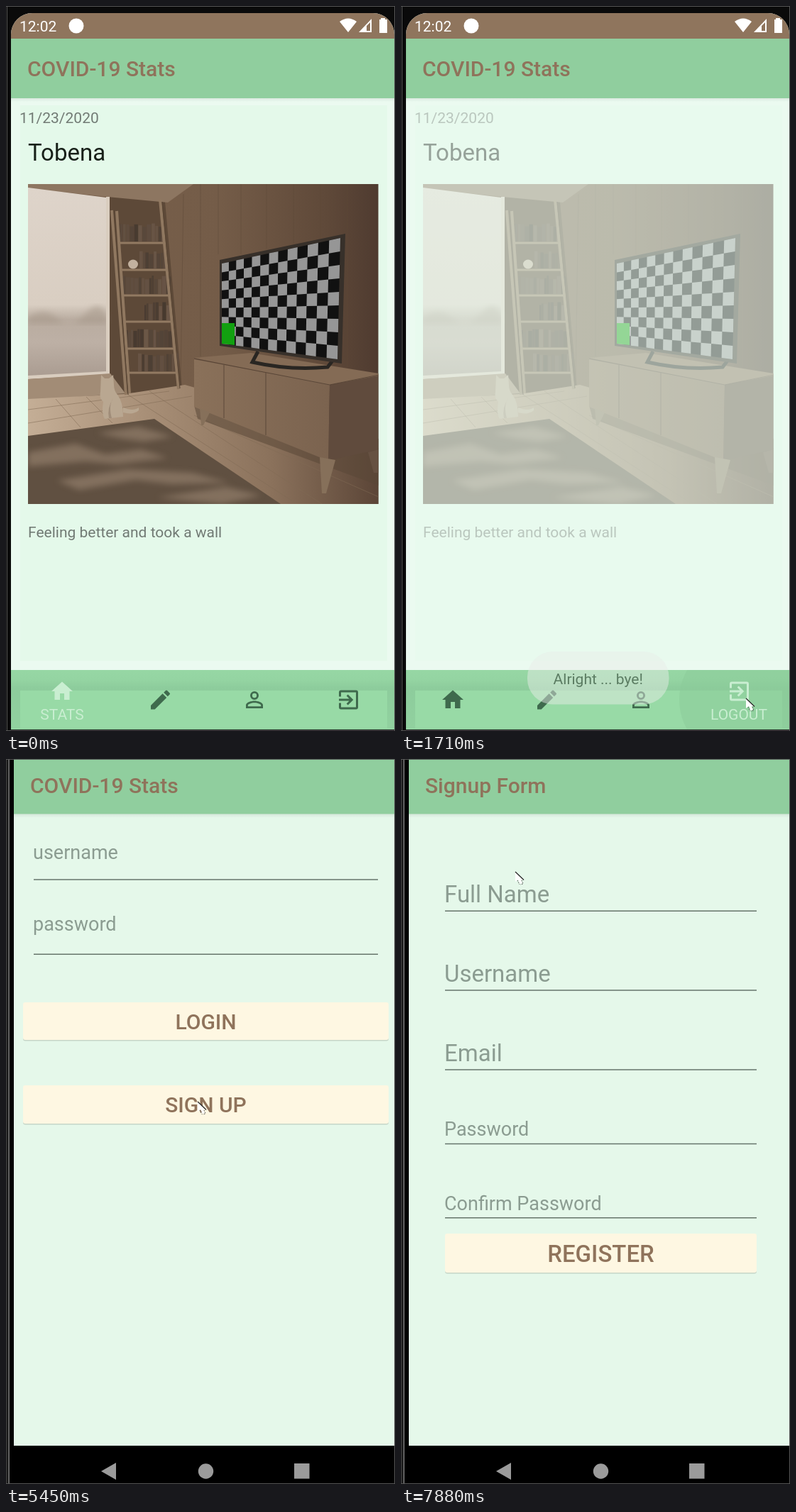
Recreate the animation shown at these times as an HTML page. Size 548 px wide and 1022 px high, loop 8000 ms.

```html
<!DOCTYPE html>
<html lang="en">
<head>
<meta charset="utf-8">
<title>Stats app</title>
<style>
html, body { margin: 0; width: 100%; height: 100%; overflow: hidden; background: #000; }
svg { display: block; width: 100vw; height: 100vh; }
text { font-family: Roboto, "Noto Sans", sans-serif; font-size: 21px; }
.title { font-size: 30px; font-weight: 500; fill: #8f735b; }
.button { font-weight: 500; fill: #8f735b; text-anchor: middle; }
.hint { fill: #8b9c91; }
.muted { fill: #717a74; }
.mid { text-anchor: middle; }
.on { fill: #c9eed1; }
.off { fill: #3f6a4d; }

.anim { animation: 8s step-end infinite; }
#home { animation-name: home; }
#account { animation-name: account; }
#content { animation-name: content; }
#tabsStats { animation-name: tabsStats; }
#tabsLogout { animation-name: tabsLogout; }
#ripple { animation-name: ripple; transform-origin: 476px 978px; }
#toast { animation-name: toast; }
#login { animation-name: login; transform-origin: 281.5px 490px; }
#loginTitle { animation-name: loginTitle; }
#press { animation-name: press; }
#signup { animation-name: signup; transform-origin: 281.5px 490px; }
#cursor { animation-name: cursor; }

@keyframes home { 0% { visibility: visible } 68.125%, 100% { visibility: hidden } }
@keyframes account { 0% { visibility: hidden } 68.125%, 100% { visibility: visible } }
@keyframes content {
  0% { opacity: 1 } 18% { opacity: .3 } 19.5% { opacity: 0 }
  21.375% { opacity: .4 } 22.9% { opacity: .85 } 24.5%, 100% { opacity: 1 }
}
@keyframes tabsStats { 0% { opacity: 1 } 18%, 100% { opacity: 0 } }
@keyframes tabsLogout { 0% { opacity: 0 } 18%, 100% { opacity: 1 } }
@keyframes ripple {
  0% { opacity: 0; transform: scale(.4) } 16.5% { opacity: .8; transform: scale(.4) }
  18% { opacity: 1; transform: scale(.75) } 19.5% { opacity: 1; transform: none }
  21.375% { opacity: .5; transform: none } 22.9%, 100% { opacity: 0; transform: none }
}
@keyframes toast {
  0% { opacity: 0 } 19.5% { opacity: .14 } 21.375% { opacity: .5 } 22.9% { opacity: .85 }
  24.5% { opacity: 1 } 43.875% { opacity: .75 } 45.4% { opacity: .4 } 46.875% { opacity: .1 }
  48.75%, 100% { opacity: 0 }
}
@keyframes login {
  0% { opacity: 1; transform: none } 86.625% { opacity: 1; transform: scale(1.008) }
  88.25% { opacity: 1; transform: scale(1.045) } 90.125% { opacity: 1; transform: scale(1.05) }
  91.75%, 100% { opacity: 0; transform: none }
}
@keyframes loginTitle { 0% { opacity: 1 } 88.25%, 100% { opacity: 0 } }
@keyframes press { 0% { opacity: 0 } 76% { opacity: .11 } 77.875% { opacity: .03 } 86.625%, 100% { opacity: 0 } }
@keyframes signup {
  0% { opacity: 0; transform: scale(.96) } 88.25% { opacity: 1; transform: scale(.96) }
  90.125% { opacity: 1; transform: scale(.993) } 91.75%, 100% { opacity: 1; transform: none }
}
@keyframes cursor {
  0% { opacity: 0; transform: translate(502px, 896px) }
  3.5% { opacity: 1; transform: translate(502px, 896px) }
  5% { opacity: 1; transform: translate(497px, 925px) }
  6.5% { opacity: 1; transform: translate(491px, 958px) }
  8% { opacity: 1; transform: translate(488px, 975px) }
  9.875% { opacity: 1; transform: translate(486px, 976px) }
  28.125% { opacity: 1; transform: translate(435px, 984px) }
  29.7% { opacity: 1; transform: translate(380px, 988px) }
  31.25% { opacity: 0; transform: translate(349px, 988px) }
  68.125% { opacity: 1; transform: translate(270px, 483px) }
  95% { opacity: 1; transform: translate(227px, 387px) }
  97% { opacity: 1; transform: translate(186px, 238px) }
  98.5%, 100% { opacity: 1; transform: translate(161px, 159px) }
}
</style>
</head>
<body>
<svg viewBox="0 0 548 1022" preserveAspectRatio="none">
<defs>
  <linearGradient id="wall"><stop stop-color="#79614c"/><stop offset=".55" stop-color="#745c48"/><stop offset=".85" stop-color="#5f4939"/><stop offset="1" stop-color="#4f3b30"/></linearGradient>
  <linearGradient id="sky" x2="0" y2="1"><stop stop-color="#ded4ca"/><stop offset=".62" stop-color="#d9cec2"/><stop offset=".7" stop-color="#b9aca0"/><stop offset=".82" stop-color="#bdb0a5"/><stop offset="1" stop-color="#aa9c91"/></linearGradient>
  <linearGradient id="floor"><stop stop-color="#c4ae96"/><stop offset=".35" stop-color="#a78e76"/><stop offset=".7" stop-color="#8a715b"/><stop offset="1" stop-color="#5b4537"/></linearGradient>
  <linearGradient id="front"><stop stop-color="#8a715a"/><stop offset="1" stop-color="#7b634f"/></linearGradient>
  <linearGradient id="shade" x2="0" y2="1"><stop stop-opacity=".07"/><stop offset="1" stop-opacity="0"/></linearGradient>
  <linearGradient id="band" x2="0" y2="1"><stop stop-color="#96d7a4"/><stop offset=".17" stop-color="#94d4a2"/><stop offset=".3" stop-color="#8dcc9c"/><stop offset="1" stop-color="#91d19f"/></linearGradient>
  <filter id="soft"><feGaussianBlur stdDeviation="4"/></filter>
  <clipPath id="screen"><path d="M7 1020V40A30 30 0 0 1 37 10H517A30 30 0 0 1 547 40V1020z"/></clipPath>
  <clipPath id="photo"><path d="M31 251H524.500V702H31z"/></clipPath>
  <clipPath id="rug"><path d="M31 606 209 582 387 702H31z"/></clipPath>
  <clipPath id="bar"><path d="M7 936H547V1020H7z"/></clipPath>
  <clipPath id="panel"><path d="M11 1H547V1021H11z"/></clipPath>
  <path id="house" d="M10 20v-6h4v6h5v-8h3L12 3 2 12h3v8z"/>
  <path id="pencil" d="M3 17.25V21h3.75L17.81 9.94l-3.75-3.75zM20.71 7.04a1 1 0 0 0 0-1.41l-2.34-2.34a1 1 0 0 0-1.41 0l-1.83 1.83 3.75 3.75z"/>
  <path id="person" fill-rule="evenodd" d="M12 5.900a2.100 2.100 0 1 1 0 4.200 2.100 2.100 0 0 1 0-4.200m0 9c2.970 0 6.100 1.460 6.100 2.100v1.100H5.900V17c0-.64 3.130-2.100 6.100-2.100M12 4a4 4 0 1 0 0 8 4 4 0 0 0 0-8m0 9c-2.670 0-8 1.340-8 4v3h16v-3c0-2.660-5.330-4-8-4z"/>
  <path id="exit" d="M10.090 15.590 11.500 17l5-5-5-5-1.410 1.410L12.670 11H3v2h9.670zM19 3H5a2 2 0 0 0-2 2v4h2V5h14v14H5v-4H3v4a2 2 0 0 0 2 2h14a2 2 0 0 0 2-2V5a2 2 0 0 0-2-2z"/>
</defs>

<g id="home" class="anim">
  <path fill="#0a0a0a" d="M0 0H548V1022H0z"/>
  <path stroke="#555" d="M1.500 0V1022M0 .5H548M547.500 0V1022M0 1021.500H548"/>
  <g clip-path="url(#screen)">
    <path fill="#ebfaf0" d="M7 10H547V1020H7z"/>
    <path fill="#8f755d" d="M7 10H547V46H7z"/>
    <path fill="#90ce9e" d="M7 46H547V130H7z"/>
    <path fill="url(#shade)" d="M7 130H547V135H7z"/>
    <g fill="#fff">
      <text x="19" y="36">12:02</text>
      <circle cx="99" cy="28" r="10.500"/>
      <path d="M470 22Q482 13 494 22L482 37zM528 17h6v2h3v19h-11v-19h2z"/>
      <path fill-rule="evenodd" d="M497 37 515 18V37zM508 35H513V23L508 28z"/>
    </g>
    <text class="title" x="30" y="99">COVID-19 Stats</text>

    <g id="content" class="anim">
      <path fill="#e4f9ea" d="M20 140H537V923H20z"/>
      <text class="muted" x="19" y="164.500">11/23/2020</text>
      <text x="31" y="218" style="font-size:33px" fill="#182019">Tobena</text>
      <g clip-path="url(#photo)">
        <path fill="url(#wall)" d="M31 251H525V702H31z"/>
        <path fill="#5d4938" d="M143 268 224 276 248 540 143 548z"/>
        <path fill="#8d7661" d="M31 251H264L228 277 143 269 31 257z"/>
        <path fill="url(#sky)" d="M31 256 141 270V517L31 522z"/>
        <path fill="#a39486" opacity=".5" filter="url(#soft)" d="M31 440Q52 422 72 440T112 434T141 436V448H31z"/>
        <path fill="#d9cdbf" d="M141 269h5V520L31 526V521L141 515z"/>
        <path fill="#a28c76" d="M31 526 147 518 168 546 31 556z"/>
        <path stroke="#5f4a39" d="M250 265 246 528M274 251V494M299 251V350M331 251V350M367 251V342M405 251V335M443 251V327M481 251V510" opacity=".5"/>
        <path fill="url(#floor)" d="M31 554 168 547 252 534 525 610V702H31z"/>
        <path fill="none" stroke="#806a55" d="M31 569 230 543M31 588 262 550M70 554 105 594M113 551 150 588M172 548 410 702M202 543 445 702M265 577 525 692" opacity=".55"/>
        <path fill="#5a4738" opacity=".55" d="M265 563 454 639 525 623V676L270 582z"/>
        <path fill="#605041" d="M31 606 209 582 387 702H31z"/>
        <g clip-path="url(#rug)">
          <path fill="#a08b77" opacity=".55" filter="url(#soft)" d="M31 629 98 617 140 632 190 625 228 637 156 646 112 642 31 649zM128 602 186 593 235 607 194 614 165 610zM72 669 171 653 262 658 315 672 233 674 183 668 103 682zM213 693 310 678 360 690 305 702z"/>
        </g>
        <g id="books"></g>
        <path fill="none" stroke="#927a62" stroke-width="3" d="M159 334H224M161 372H228M164 408H231M166 445H235M168 483H238M171 517H241"/>
        <path fill="none" stroke="#907860" stroke-width="4" d="M149 288 169 548M156 289 174 546M217 273 243 540"/>
        <path fill="none" stroke="#574433" d="M152 288 172 548M220 276 245 539"/>
        <ellipse cx="179" cy="364" rx="7" ry="6.500" fill="#c2b19f"/>
        <path fill="#b9a791" d="M134 520l5 5h6l6-5 1 14q0 8 5 14 8 10 8 31l-26 3q-5-8-2-24-6-5-4-14zM165 566q14 6 22 0v4q-8 7-22 3z"/>
        <path fill="#8f7c69" opacity=".6" d="M151 553q-7 10-2 28h-4q-3-14 6-28z"/>
        <path fill="#846b55" d="M265 496 345 489 525 518V522L456 535z"/>
        <path fill="url(#front)" d="M265 498 456 534 454 641 265 565z"/>
        <path fill="#604b3d" d="M456 534 525 521V625L454 641z"/>
        <path fill="none" stroke="#4b3a2e" d="M307 506V581M366 517V605M265 497 456 534 525 520" opacity=".7"/>
        <path fill="#86705a" d="M273 567 287 573 278 591H275zM442 636 464 640 451 687H445z"/>
        <path fill="#665142" d="M510 629 525 625V658H518z"/>
        <path fill="none" stroke="#292622" stroke-width="5" d="M355 487 347 502Q400 514 453 509L460 500"/>
        <path fill="#37302a" d="M301 358 478 321 473 504 301 479z"/>
        <path fill="#111" d="M304 363 471 327 467 498 304 476z"/>
        <path id="checks" fill="#969696"/>
        <path fill="#12a010" d="M304 447H322V478L304 476z"/>
      </g>
      <text class="muted" x="31" y="748.500">Feeling better and took a wall</text>
    </g>

    <path fill="url(#band)" d="M7 936H547V1020H7z"/>
    <path fill="#98daa6" d="M20 965H537V1018H20z"/>
    <g clip-path="url(#bar)"><circle id="ripple" class="anim" cx="476" cy="978" r="84" fill="#8bcb99"/></g>
    <g id="tabsStats" class="anim">
      <g class="on"><use href="#house" transform="translate(61 948) scale(1.5)"/><text class="mid" x="79" y="1005.500">STATS</text></g>
      <g class="off">
        <use href="#pencil" transform="translate(199.500 960) scale(1.5)"/>
        <use href="#person" transform="translate(332 960) scale(1.5)"/>
        <use href="#exit" transform="translate(464.500 960) scale(1.5)"/>
      </g>
    </g>
    <g id="tabsLogout" class="anim">
      <g class="off">
        <use href="#house" transform="translate(55 960) scale(1.5)"/>
        <use href="#pencil" transform="translate(187.500 960) scale(1.5)"/>
        <use href="#person" transform="translate(320 960) scale(1.5)"/>
      </g>
      <g class="on"><use href="#exit" transform="translate(458.500 948) scale(1.5)"/><text class="mid" x="476" y="1005.500">LOGOUT</text></g>
    </g>
    <g id="toast" class="anim">
      <rect x="178" y="910" width="199.500" height="74.500" rx="36" fill="#e8ece9" fill-opacity=".96"/>
      <text class="mid" x="277.750" y="955.500" fill="#222523">Alright ... bye!</text>
    </g>
  </g>
</g>

<g id="account" class="anim">
  <path d="M0 0H548V1022H0z"/>
  <path stroke="#666" stroke-width="2" d="M4 0V1022"/>
  <path stroke="#333" stroke-width="2" d="M1 0V1022"/>
  <g clip-path="url(#panel)">
    <g id="login" class="anim">
      <path fill="#e5f8ea" d="M11 1H552V968H11z"/>
      <path fill="#90ce9e" d="M11 -20H552V77.500H11z"/>
      <path fill="url(#shade)" d="M11 77.500H552V83H11z"/>
      <text id="loginTitle" class="title anim" x="34" y="47.500">COVID-19 Stats</text>
      <g id="loginForm"></g>
      <rect id="press" class="anim" x="24" y="460" width="515" height="54" rx="3"/>
    </g>
    <g id="signup" class="anim">
      <path fill="#e5f8ea" d="M11 1H552V968H11z"/>
      <path fill="#90ce9e" d="M11 1H552V77.500H11z"/>
      <path fill="url(#shade)" d="M11 77.500H552V83H11z"/>
      <text class="title" x="34" y="47.500">Signup Form</text>
      <g id="signupForm"></g>
    </g>
  </g>
  <path fill="#9b9b9b" d="M134 1004 155 992V1016zM406 993h21.500v21.500h-21.500z"/>
  <circle cx="281.500" cy="1004" r="10.700" fill="#9b9b9b"/>
  <path stroke="#555" d="M0 .5H548M547.500 0V1022M0 1021.500H548"/>
</g>

<g id="cursor" class="anim">
  <path fill="#fff" d="M0 0V14L4 11 7 17 10 16 8 11H12z"/>
  <path fill="none" stroke="#222" stroke-width="1.200" d="M0 0 12 11.500"/>
  <path fill="none" stroke="#444" stroke-dasharray="1.500 1.500" d="M3 12 6 18M9 12 11 17 7 18"/>
</g>
</svg>

<script>
const $ = id => document.getElementById(id);

function drawChecks(cols, rows) {
  const at = (col, row) => {
    const u = col / cols, v = row / rows, s = u * (.75 + .25 * u);
    const top = 363 - 36 * s, bottom = 476 + 22 * s;
    return `${(304 + 167 * s - 4 * s * v).toFixed(1)} ${(top + (bottom - top) * v).toFixed(1)}`;
  };
  let d = '';
  for (let r = 0; r < rows; r++)
    for (let c = r % 2; c < cols; c += 2)
      d += `M${at(c, r)}L${at(c + 1, r)} ${at(c + 1, r + 1)} ${at(c, r + 1)}z`;
  $('checks').setAttribute('d', d);
}

function drawBooks() {
  let seed = 7, out = '';
  const random = () => (seed = seed * 16807 % 2147483647) / 2147483647;
  const shelves = [[158, 332], [188, 370], [165, 406], [195, 443], [167, 481], [186, 515]];
  for (const [left, y] of shelves) {
    const right = 213 + (y - 275) * .11;
    for (let x = left; x < right;) {
      const w = 3 + random() * 4, h = 20 + random() * 6, tone = 23 + random() * 12;
      out += `<rect x="${x}" y="${y - h}" width="${w - .6}" height="${h}" fill="hsl(26 20% ${tone}%)"/>`;
      x += w;
    }
  }
  $('books').innerHTML = out;
}

const button = (label, x, y, w, h, size) => `
  <rect x="${x}" y="${y + 1.5}" width="${w}" height="${h}" rx="3" fill="#c6d6c8"/>
  <rect x="${x}" y="${y}" width="${w}" height="${h}" rx="3" fill="#fef7e2"/>
  <text class="button" x="281.500" y="${y + h / 2 + size * .37}" style="font-size:${size}px">${label}</text>`;

const field = (label, x, right, baseline, line, size) => `
  <text class="hint" x="${x - 1}" y="${baseline}" style="font-size:${size}px">${label}</text>
  <path stroke="#66756b" stroke-width="1.600" d="M${x} ${line}H${right}"/>`;

const signupField = (label, baseline, line, size) => field(label, 62, 501, baseline, line, size);

drawChecks(13, 9);
drawBooks();
$('loginForm').innerHTML =
  field('username', 39, 524, 140.5, 170, 27) + field('password', 39, 524, 242, 275.3, 27) +
  button('LOGIN', 24, 343, 515, 53, 30) + button('SIGN UP', 24, 460, 515, 54, 30);
$('signupForm').innerHTML =
  signupField('Full Name', 202, 214.3, 33) + signupField('Username', 314, 326, 33) +
  signupField('Email', 426, 438, 33) + signupField('Password', 531, 542.5, 27) +
  signupField('Confirm Password', 635.5, 646.7, 27) + button('REGISTER', 62, 669, 439, 55, 33);
</script>
</body>
</html>
```
